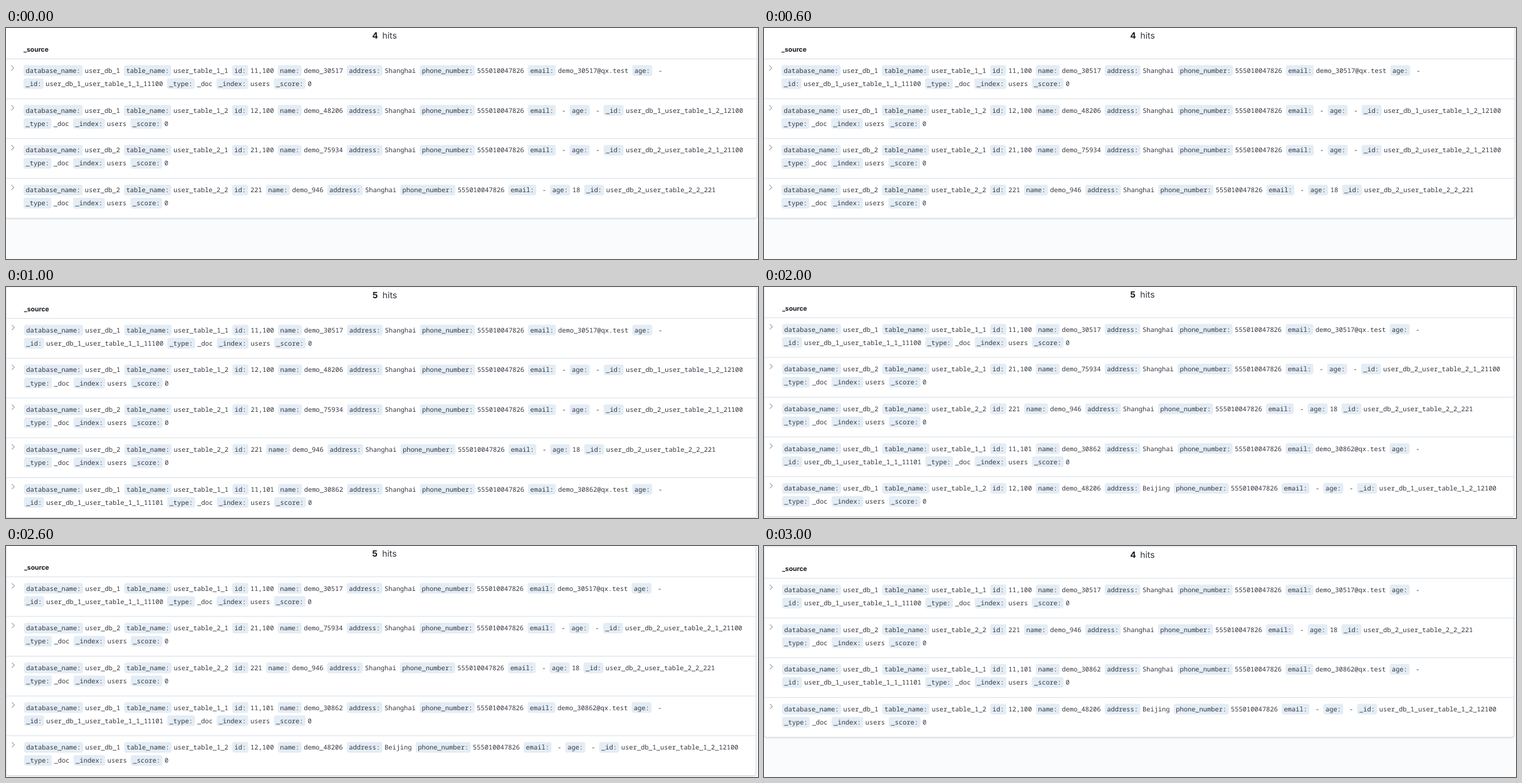
Recreate the animation shown at these times as an HTML page. Size 1200 by 370 pixels, loop 4000 ms.

```html
<!DOCTYPE html>
<html lang="en">
<head>
<meta charset="utf-8">
<title>Search hits</title>
<style>
  html, body { margin: 0; width: 100%; height: 100%; overflow: hidden; background: #fafbfc; }
  svg { display: block; width: 1200px; height: 370px; }
  text { font: 500 12px "Noto Sans Mono", monospace; fill: #343741; text-rendering: geometricPrecision; }
  .head { font: 700 12px Inter, sans-serif; fill: #1a1c21; }
  .hits { font: 16px Inter, sans-serif; }
  .count { font: 700 16px Inter, sans-serif; fill: #1a1c21; }
  .pill { fill: #e4edf5; }
  .panel { fill: #fff; stroke: #d3dae6; filter: drop-shadow(0 1.5px 1.5px rgba(152, 162, 179, .35)); }
  .rule { stroke: #d0dae7; }
  .arrow { fill: none; stroke: #555963; stroke-linecap: round; stroke-linejoin: round; }
</style>
</head>
<body>
<svg id="stage" viewBox="0 0 1200 370"></svg>
<script>
const CHAR = 7.2, PAD = 4, ROW = 73.6, LINE = 24.3, WRAP = 1330;
const LEFT = -33, RIGHT = 1350, TOP = -58.4;
const NONE = "\u00a0-";

function doc(db, table, id, name, { city = "Shanghai", email = NONE, age = NONE } = {}) {
  const dbName = `user_db_${db}`, tableName = `user_table_${db}_${table}`;
  return {
    database_name: dbName, table_name: tableName, id: id.toLocaleString("en-US"),
    name, address: city, phone_number: "555010047826", email, age,
    _id: `${dbName}_${tableName}_${id}`, _type: "_doc", _index: "users", _score: "0"
  };
}

const first = doc(1, 1, 11100, "demo_30517", { email: "demo_30517@qx.test" });
const second = doc(1, 2, 12100, "demo_48206");
const third = doc(2, 1, 21100, "demo_75934");
const fourth = doc(2, 2, 221, "demo_946", { age: "18" });
const added = doc(1, 1, 11101, "demo_30862", { email: "demo_30862@qx.test" });
const moved = doc(1, 2, 12100, "demo_48206", { city: "Beijing" });

// x, y: where the first row's text column and top rule meet
const views = [
  { x: 28, y: 49.5, scale: .8667, docs: [first, second, third, fourth] },
  { x: 28.8, y: 50.4, scale: .866, docs: [first, second, third, fourth, added] },
  { x: 28.9, y: 49.2, scale: .865, docs: [first, third, fourth, added, moved] },
  { x: 28.9, y: 51.6, scale: .865, docs: [first, fourth, added, moved] }
];

const text = (x, y, str, cls = "") => `<text x="${x}" y="${y}" class="${cls}">${str}</text>`;
const rule = y => `<path class="rule" d="M${LEFT} ${y}H${RIGHT}"/>`;

function row(fields, i) {
  const top = i * ROW;
  let x = 0, y = top, out = rule(top) + `<path class="arrow" d="M-22.2 ${top + 12.4}l4.3 4.3l-4.3 4.3"/>`;
  for (const [key, value] of Object.entries(fields)) {
    const label = key + ":", labelWidth = label.length * CHAR + 2 * PAD;
    const width = labelWidth + PAD + value.length * CHAR;
    if (x + width > WRAP) { x = 0; y += LINE; }
    out += `<rect class="pill" x="${x}" y="${y + 11.6}" width="${labelWidth}" height="19.8" rx="4"/>`
      + text(x + PAD, y + 25.8, label)
      + text(x + labelWidth + PAD, y + 25.8, value);
    x += width + CHAR;
  }
  return out;
}

function render({ x, y, scale, docs }) {
  const height = docs.length * ROW - TOP;
  return `<g transform="translate(${x} ${y}) scale(${scale})">`
    + `<rect class="panel" x="${LEFT}" y="${TOP}" width="${RIGHT - LEFT}" height="${height}" rx="4"/>`
    + text(641.9, -37.2, docs.length, "count") + text(660.6, -37.2, "hits", "hits")
    + text(0, -13.2, "_source", "head")
    + docs.map(row).join("") + "</g>";
}

const stage = document.getElementById("stage");
const start = performance.now();
let shown = -1;

function tick() {
  const index = Math.floor((performance.now() - start) / 1000) % views.length;
  if (index !== shown) stage.innerHTML = render(views[shown = index]);
  requestAnimationFrame(tick);
}
tick();
</script>
</body>
</html>
```
